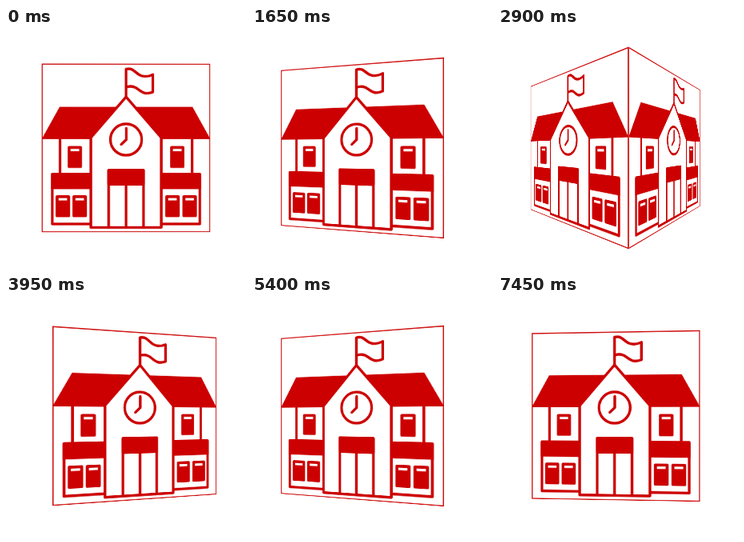
An HTML page for the animation above (7.5 s loop, 300 by 300 pixels).

```html
<!DOCTYPE html>
<html lang="en">
<head>
<meta charset="utf-8">
<title>School cube</title>
<style>
  html, body { margin: 0; width: 100%; height: 100%; overflow: hidden; background: #fff; }
  #scene { position: relative; width: 300px; height: 300px; overflow: hidden; perspective: 260px; }
  #cube { position: absolute; inset: 0; transform-style: preserve-3d; }
  .face { position: absolute; left: 0; top: 0; width: 300px; height: 300px; backface-visibility: hidden; }
</style>
</head>
<body>
<div id="scene"><div id="cube">
  <svg class="face" viewBox="44.6 44.6 210.8 210.8" fill="none" stroke="#c00" stroke-width="3.3" stroke-linecap="round" stroke-linejoin="round">
    <rect x="45.2" y="45.2" width="209.6" height="209.6" fill="#fff" stroke-width="1.3" stroke-linejoin="miter"/>
    <!-- flag -->
    <path d="M150 86V51.5C161 48.5 162 60.5 174 60.5C178 60.5 181 59.5 183.5 58.3V80C172 85 167 77 162 74.5C158 72.5 154 72.5 150 74"/>
    <!-- one wing, mirrored for the other side -->
    <g id="wing">
      <path d="M67 98.5H138L106 138.7H44.6Z" fill="#c00" stroke="none"/>
      <path d="M67.5 138V182M57.8 183V245H105"/>
      <path d="M58 181H106V201.5H56.2V183Q56.2 181 58 181Z" fill="#c00" stroke="none"/>
    </g>
    <use href="#wing" transform="matrix(-1 0 0 1 300 0)"/>
    <!-- main block -->
    <path d="M150 86L106 137V249.3H194V137Z" fill="#fff"/>
    <circle cx="150" cy="139.5" r="19.6"/>
    <path d="M150.3 125.5V139.5L144 145.5"/>
    <path d="M128.2 178V249M150 197V249M171.8 178V249"/>
    <rect x="126.6" y="176" width="46.8" height="21" rx="1.8" fill="#c00" stroke="none"/>
    <g id="windows" stroke="none"></g>
  </svg>
</div></div>
<script>
const cube = document.getElementById('cube');
const face = cube.firstElementChild;
const LOOP = 7500;

document.getElementById('windows').innerHTML =
  [[77, 147.5], [205, 147.5], [62, 209], [83, 209], [199, 209], [220.5, 209]].map(([x, y]) =>
    `<rect x="${x}" y="${y}" width="18" height="27.5" rx="2" fill="#c00"/>
     <rect x="${x + 3.6}" y="${y + 3.6}" width="10.8" height="3" fill="#fff"/>`).join('');

for (let i = 0; i < 4; i++) {
  const side = i ? cube.appendChild(face.cloneNode(true)) : face;
  side.style.transform = `rotateY(${i * 90}deg) translateZ(75px) scale(.5)`;
}

function draw() {
  const turn = performance.now() % LOOP / LOOP;
  cube.style.transform = `rotateY(${turn * 360}deg)`;
  requestAnimationFrame(draw);
}
draw();
</script>
</body>
</html>
```
